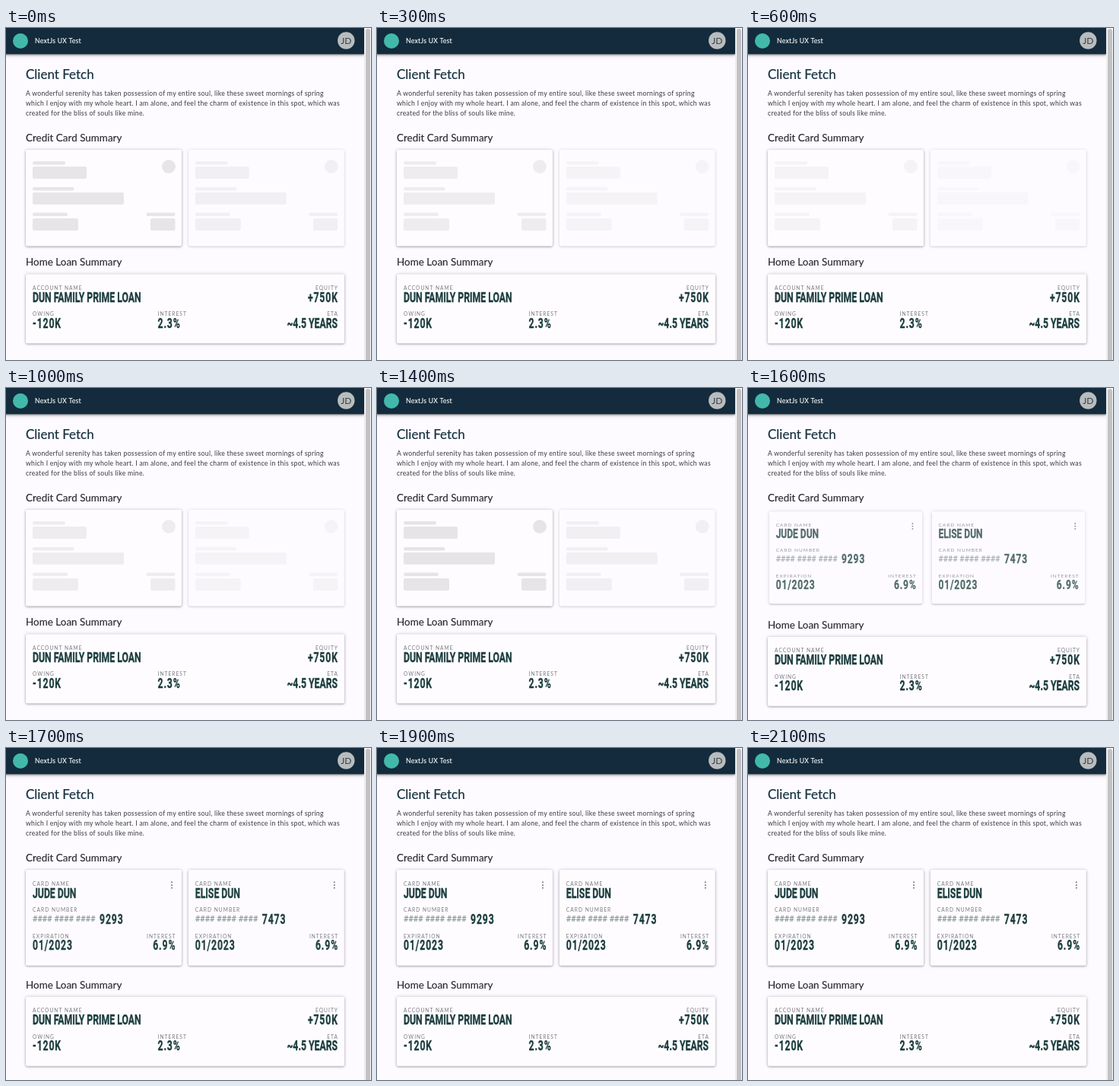
Animation, 480 px wide and 436 px high, one loop 5100 ms. Source, as an HTML page:

```html
<!DOCTYPE html>
<html lang="en">
<head>
<meta charset="utf-8">
<title>Client Fetch</title>
<style>
  html, body { margin: 0; width: 100%; height: 100%; overflow: hidden; background: #fdfbff; }
  svg { display: block; width: 100%; height: 100%; }
  text { font-family: Lato, "Open Sans", sans-serif; fill: #2b2b30; }
  .title { font-size: 17px; fill: #15303f; stroke: #15303f; stroke-width: .2px; }
  .head { font-size: 13.4px; letter-spacing: .04px; stroke: #2b2b30; stroke-width: .18px; }
  .body { font-size: 8.7px; letter-spacing: .28px; fill: #38383d; }
  .brand { font-size: 8.6px; letter-spacing: .29px; fill: #fff; stroke: #fff; stroke-width: .12px; }
  .initials { font-size: 12px; fill: #34424c; }
  .label { font-size: 6.6px; letter-spacing: 1.05px; fill: #77777c; }
  .value { font: bold 18px Roboto, sans-serif; fill: #1a3c3d; stroke: #1a3c3d; stroke-width: .35px; }
  .num { letter-spacing: 1.3px; }
  .mask { font: bold 10.8px Roboto, sans-serif; fill: #8c9999; }
  .end { text-anchor: end; }
  .mid { text-anchor: middle; }
  .page { fill: #fdfbff; }
  .panel {
    fill: #fefcff;
    filter: drop-shadow(0 1px .8px rgba(0, 0, 0, .26)) drop-shadow(0 .6px 2px rgba(0, 0, 0, .2));
  }
  .bar {
    fill: #132b3c;
    filter: drop-shadow(0 1px 1px rgba(0, 0, 0, .35)) drop-shadow(0 1px 2.5px rgba(0, 0, 0, .25));
  }
  .track { fill: #fafafa; }
  .edge { fill: #e6e6e7; }
  .thumb { fill: #c2c1c4; }
  .bone { fill: #000; fill-opacity: .095; }
  .dots { fill: #75757a; }
</style>
</head>
<body>
<svg id="stage" viewBox="0 0 480 436" xmlns="http://www.w3.org/2000/svg"></svg>
<script>
const LOOP = 5100;
const CARD_GAP = 213.8;
const CARD_MID = [128.5, 223];
const CONDENSE = 0.68; // narrow display face

const text = (cls, x, y, str) => `<text class="${cls}" x="${x}" y="${y}">${str}</text>`;

const rect = (cls, x, y, w, h, r = 2) =>
  `<rect class="${cls}" x="${x}" y="${y}" width="${w}" height="${h}" rx="${r}"/>`;

const circle = (cx, cy, r, attrs = '') => `<circle cx="${cx}" cy="${cy}" r="${r}" ${attrs}/>`;

const display = (cls, x, y, str) =>
  `<text class="${cls}" transform="translate(${x} ${y}) scale(${CONDENSE} 1)">${str}</text>`;

function field(x, y, label, value, end = false) {
  const side = end ? ' end' : '';
  const num = /^\S*\d\S*$/.test(value) ? ' num' : '';
  return text('label' + side, end ? x + 1 : x, y, label) +
    display('value' + num + side, end && num ? x + 0.8 : x, y + 15.5, value);
}

function skeleton() {
  const bones = [
    [35, 175, 43, 4.5], [35, 182, 71, 16],
    [35, 209, 54.5, 4.5], [35, 216, 120, 15.7],
    [35, 242.5, 46, 4.5], [35, 250, 60, 16],
    [184.5, 242.5, 38, 4.5], [190, 250, 32.5, 16]
  ];
  return rect('panel', 26, 160, 205, 126.5) +
    `<g class="pulse">${bones.map(b => rect('bone', ...b)).join('')}` +
    circle(214, 182, 9, 'class="bone"') + '</g>';
}

function card(name, digits) {
  return rect('panel', 26, 160, 205, 125.7) +
    field(35, 181, 'CARD NAME', name) +
    text('label', 35, 215, 'CARD NUMBER') +
    text('mask', 35, 228.4, '#### #### ####') +
    display('value num', 123, 230.7, digits) +
    field(35, 249.7, 'EXPIRATION', '01/2023') +
    field(222.5, 249.7, 'INTEREST', '6.9%', true) +
    `<g class="dots">${[176.3, 180, 183.7].map(y => circle(218, y, 1)).join('')}</g>`;
}

const shifted = (inner, opacity = 1) =>
  `<g transform="translate(${CARD_GAP} 0)" opacity="${opacity}">${inner}</g>`;

const grow = inner => `<g class="grow">${inner}</g>`;

const stage = document.getElementById('stage');
stage.innerHTML =
  rect('page', 0, 0, 480, 436, 0) +
  rect('bar', -5, -5, 476, 39.3, 0) +
  circle(19, 17, 10, 'fill="#42b8ab"') +
  text('brand', 38, 19.8, 'NextJs UX Test') +
  circle(447.3, 16.5, 11.2, 'fill="#b9bcbd"') +
  text('initials mid', 447.3, 20.8, 'JD') +
  rect('track', 471, 0, 9, 436, 0) +
  rect('edge', 471, 0, 1, 436, 0) +
  rect('thumb', 473, 1, 6, 440, 3) +
  text('title', 26, 67, 'Client Fetch') +
  text('body', 26, 89, 'A wonderful serenity has taken possession of my entire soul, like these sweet mornings of spring') +
  text('body', 26, 102, 'which I enjoy with my whole heart. I am alone, and feel the charm of existence in this spot, which was') +
  text('body', 26, 115, 'created for the bliss of souls like mine.') +
  text('head', 26, 148.7, 'Credit Card Summary') +
  `<g id="loading">${skeleton()}${shifted(skeleton(), 0.5)}</g>` +
  `<g id="cards">${grow(card('JUDE DUN', '9293'))}${shifted(grow(card('ELISE DUN', '7473')))}</g>` +
  '<g id="loan">' +
    text('head', 26, 312.3, 'Home Loan Summary') +
    rect('panel', 26, 323.3, 419, 91) +
    field(35, 344, 'ACCOUNT NAME', 'DUN FAMILY PRIME LOAN') +
    field(436, 344, 'EQUITY', '+750K', true) +
    field(35, 378.4, 'OWING', '-120K') +
    field(199.5, 378.4, 'INTEREST', '2.3%') +
    field(436, 378.4, 'ETA', '~4.5 YEARS', true) +
  '</g>';

const [loading, cards, loan] = ['loading', 'cards', 'loan'].map(id => document.getElementById(id));
const pulses = stage.querySelectorAll('.pulse');
const growers = stage.querySelectorAll('.grow');

const clamp = v => Math.min(1, Math.max(0, v));

// cubic-bezier(.4, 0, .2, 1), solved for x by bisection
function ease(x) {
  let lo = 0, hi = 1, u = 0.5;
  for (let i = 0; i < 24; i++) {
    u = (lo + hi) / 2;
    const bx = 1.2 * u * (1 - u) ** 2 + 0.6 * u * u * (1 - u) + u ** 3;
    if (bx < x) lo = u; else hi = u;
  }
  return 3 * u * u * (1 - u) + u ** 3;
}

function render(ms) {
  // the picture advances in 100 ms steps, the first one held twice as long
  const t = ms < 200 ? 0 : Math.floor(ms / 100) * 100;
  const loaded = t >= 1500;
  loading.style.display = loaded ? 'none' : '';
  cards.style.display = loaded ? '' : 'none';
  loan.setAttribute('transform', `translate(0 ${loaded ? 3.4 : 0})`);

  if (!loaded) {
    const dip = (1 - Math.cos(2 * Math.PI * (t + 100) / 1500)) / 2;
    pulses.forEach(g => g.setAttribute('opacity', 1 - 0.6 * dip));
    return;
  }
  const since = t - 1450;
  const s = 0.75 + 0.25 * ease(clamp(since / 220));
  const [cx, cy] = CARD_MID;
  const fade = ease(clamp(since / 310));
  growers.forEach(g => {
    g.setAttribute('opacity', fade);
    g.setAttribute('transform', `translate(${cx} ${cy}) scale(${s} ${s * s}) translate(${-cx} ${-cy})`);
  });
}

const start = performance.now();
function tick() {
  render((performance.now() - start) % LOOP);
  requestAnimationFrame(tick);
}
tick();
</script>
</body>
</html>
```
